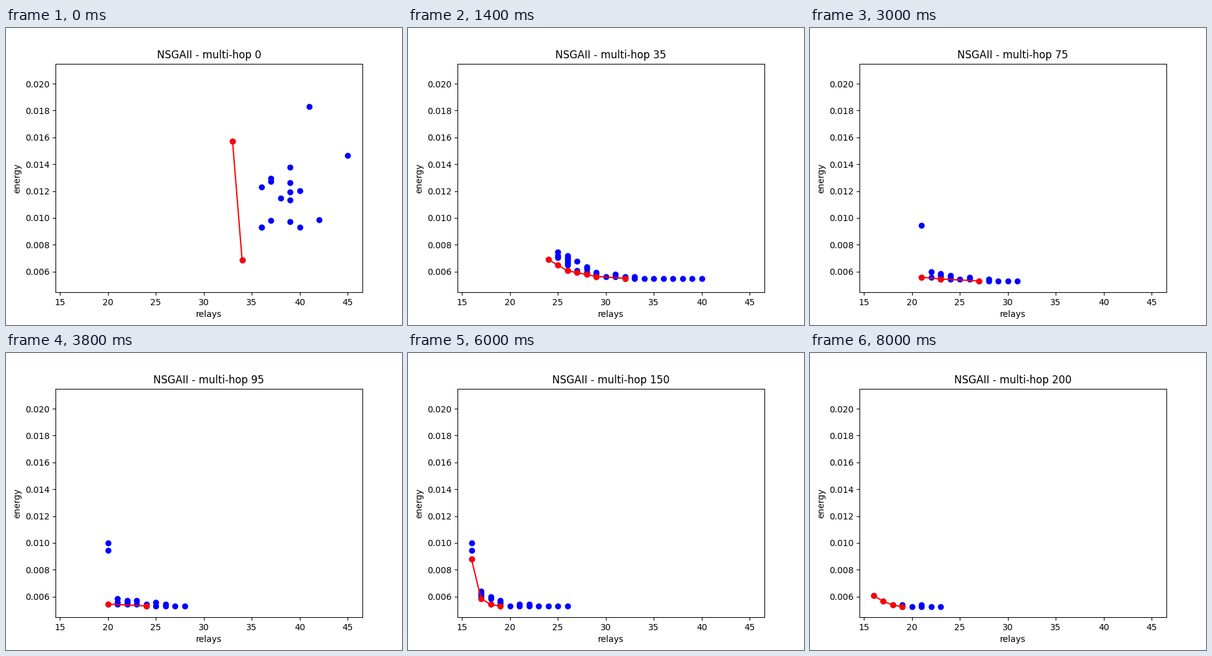
A matplotlib script for the animation above (8200 ms loop, 640 by 480 pixels).

```python
import numpy as np
import matplotlib.pyplot as plt
from matplotlib.animation import FuncAnimation

FRAMES, INTERVAL, GENS_PER_FRAME = 41, 200, 5
UNIT = 1e-5    # energies are handled in units of 1e-5
LEVEL = 14     # spacing between energy levels
SEARCH = 3     # step at which the population has settled into columns

# Key steps of the search and the shape of the population there
STEPS = [3, 11, 19, 26, 34, 40]
BASE = [569, 530, 530, 530, 525, 523]    # lowest energy
RISE = [240, 41, 18, 92, 600, 85]        # height of the front's left end
DECAY = [1.7, 3, 4, 0.6, 0.55, 1.2]      # how fast the front falls, in relays
SPREAD = [320, 110, 90, 90, 130, 50]     # depth of the cloud above the front

FIRST_POINTS = [(33, 1573), (34, 684), (41, 1831), (45, 1467)]
STRAGGLERS = [(945, 11), (1000, 19)]     # energy, first step
LAST_STRAGGLER = 30


def left_edge(i):
    return np.interp(i, [0, 3, 6, 11, 24, 26, 30],
                     [33, 28, 25, 22, 19, 18, 16])


def right_edge(i):
    return np.interp(i, [0, 3, 6, 11, 19, 26, 34, 40],
                     [45, 41, 42, 34, 28, 24, 27, 23])


def scattered(i):
    """Random first generation, sinking and drifting left."""
    rng = np.random.default_rng(7)
    x = rng.normal(38.6, 2.6, 15).clip(34, 44)
    energy = rng.normal(1240, 200, 15).clip(930, 1610)
    points = np.vstack([FIRST_POINTS, np.column_stack([x, energy])])
    points[:, 0] += left_edge(i) - left_edge(0)
    points[:, 1] = 600 + (points[:, 1] - 600) * (1 - i / 4)
    return points


def columns(i):
    """Columns of energy levels standing on an exponential front."""
    rng = np.random.default_rng(i)
    base, rise, decay, spread = (np.interp(i, STEPS, track)
                                 for track in (BASE, RISE, DECAY, SPREAD))
    left, right = round(left_edge(i)), round(right_edge(i))
    points = [(left, energy) for energy, start in STRAGGLERS
              if start <= i <= LAST_STRAGGLER]
    for d in range(right - left + 1):
        low = rise * np.exp(-d / decay)
        high = low + spread * d * np.exp(-d / 1.5)
        bottom, top = round(low / LEVEL), round(high / LEVEL)
        points += [(left + d, base + n * LEVEL) for n in range(bottom, top + 1)
                   if n == bottom or rng.random() < 0.6]
    return np.array(points, float)


def population(i):
    x, energy = (scattered(i) if i < SEARCH else columns(i)).T
    return np.round(x), energy * UNIT


def pareto(x, energy):
    best, front = np.inf, []
    for k in np.lexsort((energy, x)):
        if energy[k] < best - 1e-9:
            best = energy[k]
            front.append(k)
    return x[front], energy[front]


fig, ax = plt.subplots(figsize=(6.4, 4.8), dpi=100)
ax.set_xlim(14.54, 46.54)
ax.set_ylim(0.00445, 0.0215)
ax.set_xlabel("relays")
ax.set_ylabel("energy")
title = ax.set_title("")
dots, = ax.plot([], [], "bo")
front, = ax.plot([], [], "ro-")


def update(i):
    x, energy = population(i)
    dots.set_data(x, energy)
    front.set_data(*pareto(x, energy))
    title.set_text(f"NSGAII - multi-hop {i * GENS_PER_FRAME}")
    return dots, front, title


anim = FuncAnimation(fig, update, frames=FRAMES, interval=INTERVAL,
                     repeat=True, repeat_delay=0)
plt.show()
```
